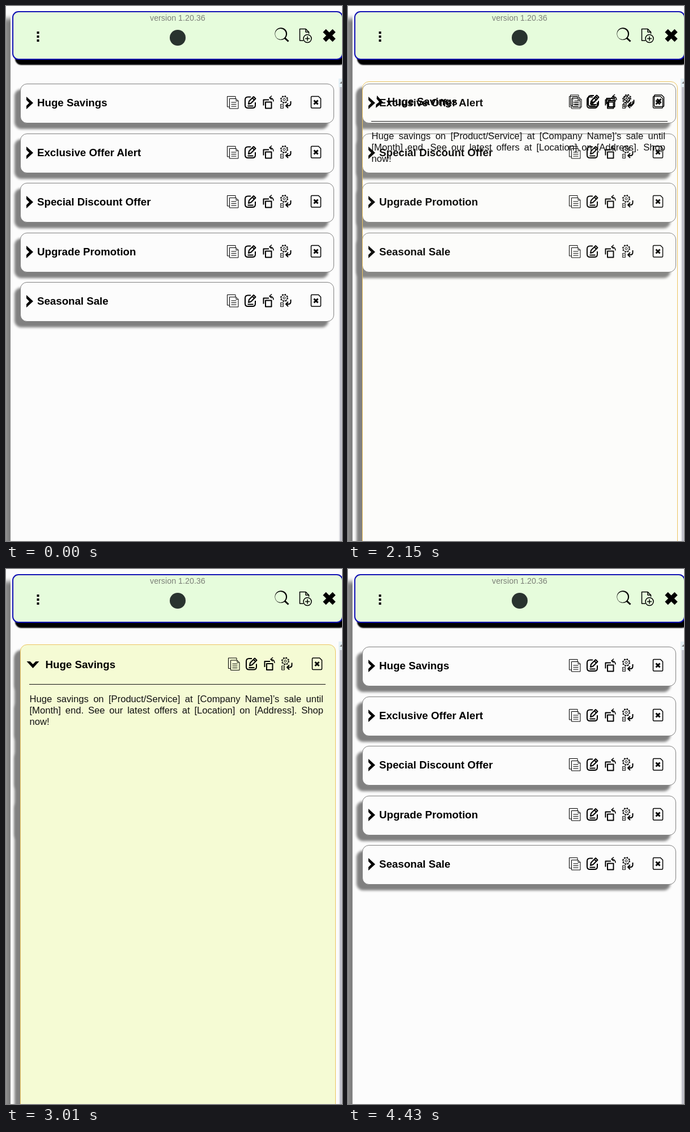
An HTML page that plays this animation: 593x944 px, repeating every 5.05 s.

```html
<!DOCTYPE html>
<html lang="en">
<head>
<meta charset="utf-8">
<title>Message list</title>
<style>
  html, body { margin: 0; width: 100%; height: 100%; overflow: hidden; background: #fcfcfc; }
  body { position: relative; font-family: "Liberation Sans", Arial, sans-serif; }
  div, p, svg { position: absolute; box-sizing: border-box; margin: 0; }
  svg { left: 0; top: 0; width: 593px; height: 100px; overflow: visible; }
  .page { left: 8px; top: 12px; width: 620px; height: 1000px; background: #fcfcfc; box-shadow: -12px 10px 8px #808080; }
  .bar { left: 11px; top: 9px; width: 584px; height: 86px; border: 2px solid #1212b4; border-radius: 11px;
         background: #e6fcdc; box-shadow: 5px 9px 2px #000; }
  .track { left: 587px; top: 128px; width: 6px; height: 816px; background: #f0f0f2; }
  .track div { left: 2px; top: 15px; width: 4px; height: 801px; background: #c2c2ca; }
  .track svg { width: 6px; height: 15px; background: #e4f0f6; }
  .row { left: 0; width: 593px; height: 70px; }
  .box { left: 25px; width: 553.5px; height: 70px; border: 1px solid #808080; border-radius: 12px;
         background: #fcfcfc; box-shadow: -10px 10px 4px #808080; }
  #detail { left: 0; top: 133px; width: 593px; height: 900px; }
  #detail .box { width: 556.5px; height: 900px; border-color: #ecc460; }
  #detail svg { top: 1.5px; }
  .rule { left: 41px; top: 70px; width: 523px; height: 1px; background: #111; }
  p { left: 41.5px; top: 87px; width: 518.5px; font-size: 16.6px; line-height: 20.1px; text-align: justify; color: #111; }
  .title { font-weight: bold; font-size: 18.7px; }
  .version { font-size: 14.3px; fill: #7c8078; }
  .line { fill: none; stroke: #000; stroke-width: 2; stroke-linejoin: round; }
  .hair { stroke-width: 1; }
  .thin { stroke-width: 1.5; }
  .thick { stroke-width: 3; }
</style>
</head>
<body>
<svg style="width:0;height:0"><defs>
  <g id="icons" class="line">
    <path class="hair" d="M394 41h-3.500V22.500H405V26M394.500 26.500H406l4 4V44H394.500ZM406 26.500v4h4M397.500 33h9M397.500 36.500h9M397.500 40h9"/>
    <path d="M432 23.500h-5q-5 0-5 5V38q0 5 5 5h8q5 0 5-5v-5M426.500 39.500h10M428 36l1-5 8-8 3.500 3.500-8 8ZM435 25.500l3.500 3.500"/>
    <path d="M458 32.500h10.500V43.500H458ZM454.500 38.500V28.500H464"/>
    <path class="thin" d="M472 31.500q0-6-6.500-6.500M469 21.500l-4 3.500 4 3.500"/>
    <circle class="thin" cx="491" cy="28" r="6.300" stroke-dasharray="2.500 2.450"/>
    <circle class="hair" cx="491" cy="28" r="5.200"/><circle class="hair" cx="491" cy="28" r="2"/>
    <path class="hair" d="M484.500 36.500h5v7h-5ZM486 39h2M486 41h2"/>
    <path d="M502.500 31v4q0 4-4 4h-4M498 35l-4 4 4 4"/>
    <path class="thin" d="M540 22.500h11.500l4 4V41.500q0 1.500-1.500 1.500H540q-1.500 0-1.500-1.500V24q0-1.500 1.500-1.500Z"/>
    <path class="thick" d="M543.500 29.500l7 7M550.500 29.500l-7 7"/>
  </g>
</defs></svg>

<div class="page"></div>
<div class="bar"></div>
<svg>
  <text class="version" x="254" y="26">version 1.20.36</text>
  <path d="M54.500 45h4v4h-4ZM54.500 52h4v4h-4ZM54.500 59h4v4h-4Z"/>
  <circle cx="303" cy="56" r="14" fill="#29332f"/>
  <path fill-rule="evenodd" d="M474.500 49a10.800 10.800 0 1 1 21.600 0a10.800 10.800 0 1 1-21.600 0ZM475 49.500a9.500 9.500 0 1 0 19 0a9.500 9.500 0 1 0-19 0Z"/>
  <g class="line">
    <path class="thick" d="M491.500 56l7 6.500"/>
    <path class="thin" d="M525 61h-6.500V40.500H529l5.500 5.500v3M529 40.500V46h5.500"/>
    <circle class="thin" cx="532" cy="57.500" r="7"/>
    <path class="thin" d="M528 57.500h8M532 53.500v8"/>
    <path style="stroke-width:7.500" d="M562 43.500l17 17M579 43.500l-17 17"/>
  </g>
</svg>
<div class="track"><div></div><svg><path d="M2 9l3-4 3 4Z" fill="#888"/></svg></div>
<div id="list"></div>
<div id="detail"></div>

<script>
const LOOP = 5050, OPEN = 2150, CLOSE = 3560, FADE = 500, PITCH = 87.6;
const titles = ["Huge Savings", "Exclusive Offer Alert", "Special Discount Offer", "Upgrade Promotion", "Seasonal Sale"];
const $ = id => document.getElementById(id);

const box = '<div class="box"></div>';
const head = (title, shift = 0, iconShift = 0) => `<svg>
  <g transform="translate(${37.5 + shift} 29.5)"><path class="arrow" d="M-1.500-6.500 10.500 4.500-1.500 15.500V9.500L3.500 4.500-1.500-.5Z"/></g>
  <text class="title" x="${55 + shift}" y="40">${title}</text>
  <use href="#icons" x="${iconShift}" y="${-iconShift / 4}"/></svg>`;

$("list").innerHTML = titles.map(t => `<div class="row">${box}${head(t)}</div>`).join("");
$("detail").innerHTML = box + head(titles[0], 14.5, 2) + `<div class="rule"></div>
  <p>Huge savings on [Product/Service] at [Company Name]’s sale until [Month] end. See our latest offers at [Location] on [Address]. Shop now!</p>`;

const rows = [...document.querySelectorAll(".row")];
const [firstBox, detailBox] = [rows[0], $("detail")].map(el => el.querySelector(".box"));
const [firstArrow, detailArrow] = [rows[0], $("detail")].map(el => el.querySelector(".arrow"));

const progress = (t, start) => Math.min(1, Math.max(0, (t - start) / FADE));
const white = [252, 252, 252], cream = [245, 251, 212];
const tint = k => `rgb(${white.map((c, i) => c + (cream[i] - c) * k)})`;
const turn = (arrow, k) => arrow.setAttribute("transform", `rotate(${90 * k})`);

function draw(now) {
  const t = now % LOOP;
  const open = t >= OPEN && t < CLOSE;
  const opening = progress(t, OPEN - 30);
  const closing = t < CLOSE ? 0 : 1 - progress(t, CLOSE);

  $("detail").style.display = open ? "" : "none";
  rows.forEach((row, i) => row.style.top = 137 + PITCH * (open ? i - 1 : i) + "px");
  rows[0].style.display = open ? "none" : "";
  // The open card turns opaque over the list beneath it.
  detailBox.style.background = `rgba(${cream}, ${opening})`;
  firstBox.style.background = tint(closing);
  turn(detailArrow, opening);
  turn(firstArrow, closing);
}

const start = performance.now();
function tick() {
  draw(performance.now() - start);
  requestAnimationFrame(tick);
}
tick();
</script>
</body>
</html>
```
